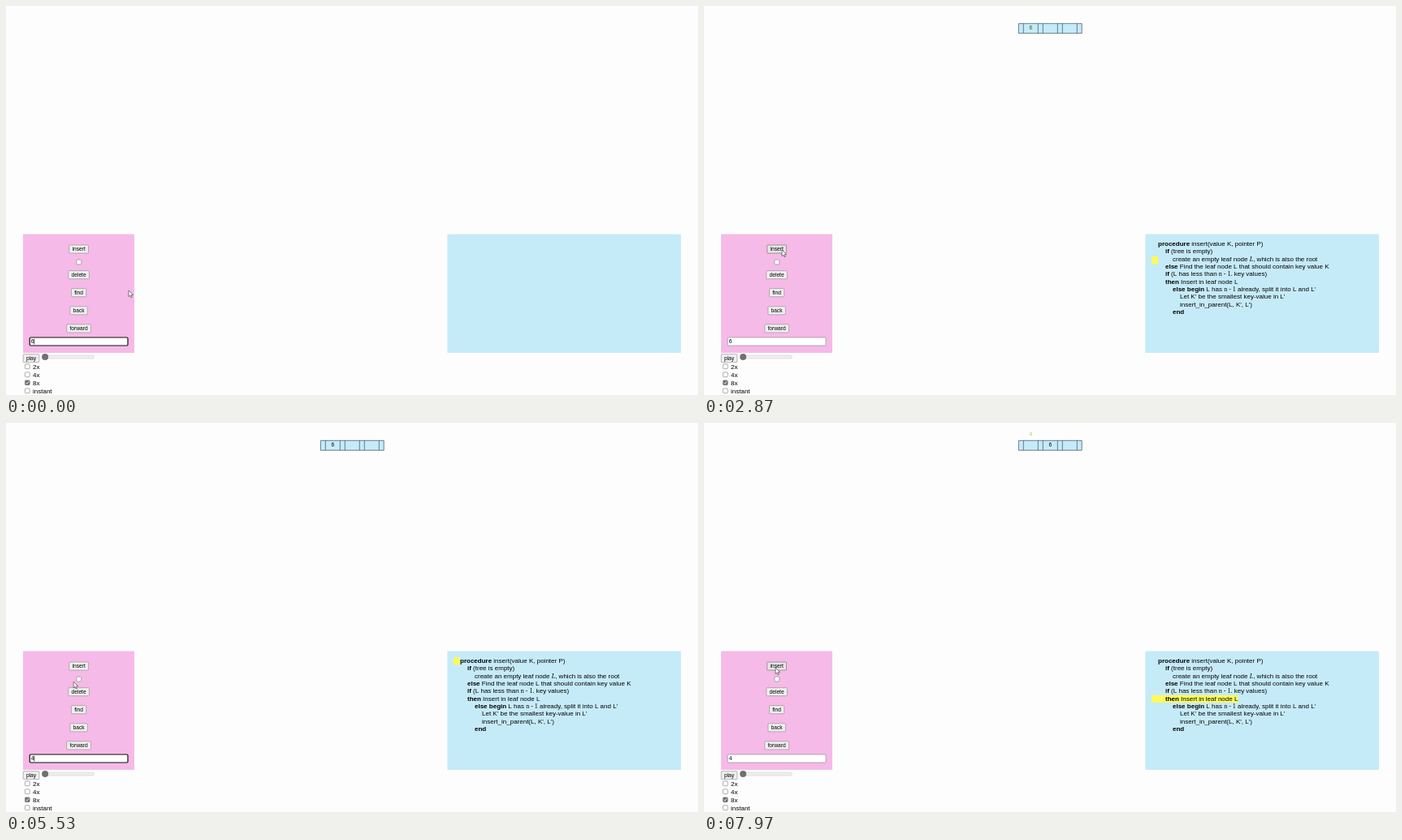
Recreate the animation shown at these times as an HTML page with a canvas. Size 852x480 px, loop 8 s.

```html
<!DOCTYPE html>
<html lang="en">
<head>
<meta charset="utf-8">
<title>B+ tree insertion</title>
<style>
html, body { margin: 0; width: 100%; height: 100%; overflow: hidden; background: #fdfdfd; }
canvas { display: block; width: 852px; height: 480px; }
</style>
</head>
<body>
<canvas id="stage" width="852" height="480"></canvas>
<script>
const ctx = document.getElementById('stage').getContext('2d');
const LOOP = 8000;
const SANS = '"Liberation Sans", Arial, sans-serif';
const SERIF = '"Liberation Serif", "Times New Roman", serif';
const FONTS = {
  n: `8px ${SANS}`,
  b: `bold 8px ${SANS}`,
  m: `8px ${SERIF}`,
  i: `italic 8px ${SERIF}`,
  s: `6.67px ${SANS}`
};
const PAGE = '#fdfdfd', PINK = '#f5bae7', SKY = '#c6ebf8';

// Pseudocode: indent level, then runs of [font, text]
const CODE = [
  [0, ['b', 'procedure'], ['n', ' insert(value K, pointer P)']],
  [1, ['b', 'if'], ['n', ' (tree is empty)']],
  [2, ['n', 'create an empty leaf node '], ['i', 'L'], ['n', ', which is also the root']],
  [1, ['b', 'else'], ['n', ' Find the leaf node L that should contain key value K']],
  [1, ['b', 'if'], ['n', ' (L has less than '], ['m', 'n - 1.'], ['n', ' key values)']],
  [1, ['b', 'then'], ['n', ' Insert in leaf node L']],
  [2, ['b', 'else begin'], ['n', ' L has '], ['m', 'n - 1'], ['n', " already, split it into L and L'"]],
  [3, ['n', "Let K' be the smallest key-value in L'"]],
  [3, ['n', "insert_in_parent(L, K', L')"]],
  [2, ['b', 'end']]
];
const lineY = i => 293.6 + i * 9.33;

// Highlight stops: time the bar starts to grow, line, how far it grows
const STOPS = [
  [570, 0, 0], [879, 0, 1], [1234, 1, 1], [1589, 2, 1], [2053, 4, 1], [2408, 5, 1],
  [2900, 0, 0],
  [6260, 0, 1], [6615, 1, 1], [6970, 3, 1], [7325, 4, 1], [7680, 5, 1]
];
const GROW = 125, MOVE = 70;

// Pointer: time, x, y
const PATH = [
  [0, 151, 351], [30, 151, 351], [400, 96, 301], [3700, 96, 301], [4216, 58, 410],
  [4975, 58, 410], [5900, 88, 302], [8000, 88, 302]
];

const ramp = (t, a, b) => Math.min(1, Math.max(0, (t - a) / (b - a)));
const easeOut = u => 1 - (1 - u) ** 2;
const mix = (a, b, u) => a + (b - a) * u;

function text(str, x, y, font, color = '#000', align = 'left') {
  ctx.font = FONTS[font];
  ctx.fillStyle = color;
  ctx.textAlign = align;
  ctx.fillText(str, x, y);
}

function box(x, y, w, h, fill, stroke, r = 0, line = 0.6) {
  ctx.beginPath();
  ctx.roundRect(x, y, w, h, r);
  ctx.fillStyle = fill;
  ctx.fill();
  if (stroke) {
    ctx.strokeStyle = stroke;
    ctx.lineWidth = line;
    ctx.stroke();
  }
}

function button(label, cx, cy, hover) {
  ctx.font = FONTS.s;
  const w = ctx.measureText(label).width + 7.4;
  box(cx - w / 2, cy - 5, w, 10, hover ? '#e5e5e5' : '#efefef', hover ? '#6a6a6a' : '#8a8a8a', 0.8);
  text(label, cx, cy + 2.3, 's', '#000', 'center');
}

function checkbox(x, y, checked) {
  box(x - 2.9, y - 2.9, 5.8, 5.8, checked ? '#6b6b6b' : '#fff', '#767676', 1.2);
  if (!checked) return;
  ctx.beginPath();
  ctx.moveTo(x - 1.8, y);
  ctx.lineTo(x - 0.5, y + 1.4);
  ctx.lineTo(x + 1.9, y - 1.6);
  ctx.strokeStyle = '#fff';
  ctx.lineWidth = 0.9;
  ctx.stroke();
}

function pointerAt(t) {
  const k = PATH.findIndex(p => p[0] > t);
  const [t0, x0, y0] = PATH[k - 1], [t1, x1, y1] = PATH[k];
  const u = easeOut(ramp(t, t0, t1));
  return [mix(x0, x1, u), mix(y0, y1, u)];
}

function drawControls(t, px, py) {
  box(21, 281.5, 137, 146.5, PINK);
  [['insert', 300], ['delete', 331.7], ['find', 353.7], ['back', 375.8], ['forward', 397.9]]
    .forEach(([label, y]) => button(label, 89.6, y, Math.abs(px - 89.6) < 12 && Math.abs(py - y) < 5));
  checkbox(89.8, 316);

  const focus = t < 570 || (t > 4250 && t < 5962);
  box(29.2, 409, 120.8, 10, '#fff', focus ? '#101010' : '#858585', focus ? 1.2 : 0.5, focus ? 1.2 : 0.6);
  const value = t < 4500 ? '6' : t < 4900 ? '' : '4';
  text(value, 30.8, 416.3, 's');
  if (focus) {
    ctx.fillStyle = '#000';
    ctx.fillRect(value ? 34.5 : 31, 410.7, 0.7, 6.8);
  }

  button('play', 31, 434.7);
  box(45, 431.2, 63.5, 3.8, '#efefef', '#c4c4c4', 1.9, 0.5);
  ctx.beginPath();
  ctx.arc(48.1, 433.1, 4, 0, Math.PI * 2);
  ctx.fillStyle = '#707070';
  ctx.fill();
  ['2x', '4x', '8x', 'instant'].forEach((label, i) => {
    checkbox(26.3, 444.8 + i * 10, i === 2);
    text(label, 33, 447.9 + i * 10, 'n');
  });
}

function lineEnd([indent, ...runs]) {
  return runs.reduce((x, [font, str]) => {
    ctx.font = FONTS[font];
    return x + ctx.measureText(str).width;
  }, 559 + indent * 9);
}

function drawHighlight(t) {
  const k = STOPS.findLastIndex(s => t >= s[0] - MOVE);
  if (k < 0) return;
  const [start, line, reach] = STOPS[k];
  const from = STOPS[Math.max(0, k - 1)][1];
  const next = k + 1 < STOPS.length ? STOPS[k + 1][0] : Infinity;
  const y = mix(lineY(from), lineY(line), ramp(t, start - MOVE, start));
  let grow = reach * ramp(t, start, start + GROW);
  if (next < Infinity) grow *= 1 - ramp(t, next - 2 * MOVE, next - MOVE);
  ctx.fillStyle = '#fff95a';
  ctx.fillRect(551, y - 4.4, mix(8, lineEnd(CODE[line]) - 551, grow), 9);
}

function drawCode(t) {
  box(543.3, 281.5, 287.7, 146.5, SKY);
  if (t < 570) return;
  drawHighlight(t);
  CODE.forEach(([indent, ...runs], i) => {
    let x = 559 + indent * 9;
    for (const [font, str] of runs) {
      text(str, x, lineY(i) + 2.5, font);
      x += ctx.measureText(str).width;
    }
  });
}

// A key fades in above its cell, drops in, then darkens
function drawKey(t, label, x, start) {
  const drop = easeOut(ramp(t, start + 125, start + 250));
  const dark = ramp(t, start + 250, start + 375);
  ctx.globalAlpha = ramp(t, start, start + 75);
  const color = `rgb(${mix(160, 0, dark)}, ${mix(222, 0, dark)}, ${mix(50, 0, dark)})`;
  text(label, x, mix(16.3, 29.3, drop), 's', color, 'center');
  ctx.globalAlpha = 1;
}

function drawNode(t) {
  if (t < 1700) return;
  ctx.globalAlpha = ramp(t, 1700, 1840);
  box(387.4, 21.7, 77.8, 12, SKY, '#4a6070', 0, 0.8);
  ctx.beginPath();
  for (let i = 0; i < 3; i++) {
    for (const x of [393.3, 411.3]) {
      ctx.moveTo(x + i * 24, 21.7);
      ctx.lineTo(x + i * 24, 33.7);
    }
  }
  ctx.stroke();
  ctx.globalAlpha = 1;
  drawKey(t, '6', 402.3 + 24 * easeOut(ramp(t, 7770, 7890)), 2540);
  drawKey(t, '4', 402.3, 7890);
}

function drawPointer(x, y) {
  ctx.save();
  ctx.translate(x, y);
  ctx.beginPath();
  [[0, 0], [0, 7.6], [1.8, 6], [3, 8.8], [4.3, 8.2], [3.1, 5.5], [5.5, 5.4]]
    .forEach(([a, b]) => ctx.lineTo(a, b));
  ctx.closePath();
  ctx.fillStyle = '#fff';
  ctx.fill();
  ctx.strokeStyle = '#4a4a4a';
  ctx.lineWidth = 0.7;
  ctx.stroke();
  ctx.restore();
}

function draw(now) {
  const t = now % LOOP;
  const [px, py] = pointerAt(t);
  ctx.fillStyle = PAGE;
  ctx.fillRect(0, 0, 852, 480);
  drawControls(t, px, py);
  drawCode(t);
  drawNode(t);
  drawPointer(px, py);
}

let began;
function tick(now) {
  began ??= now;
  draw(now - began);
  requestAnimationFrame(tick);
}
draw(0);
requestAnimationFrame(tick);
</script>
</body>
</html>
```
